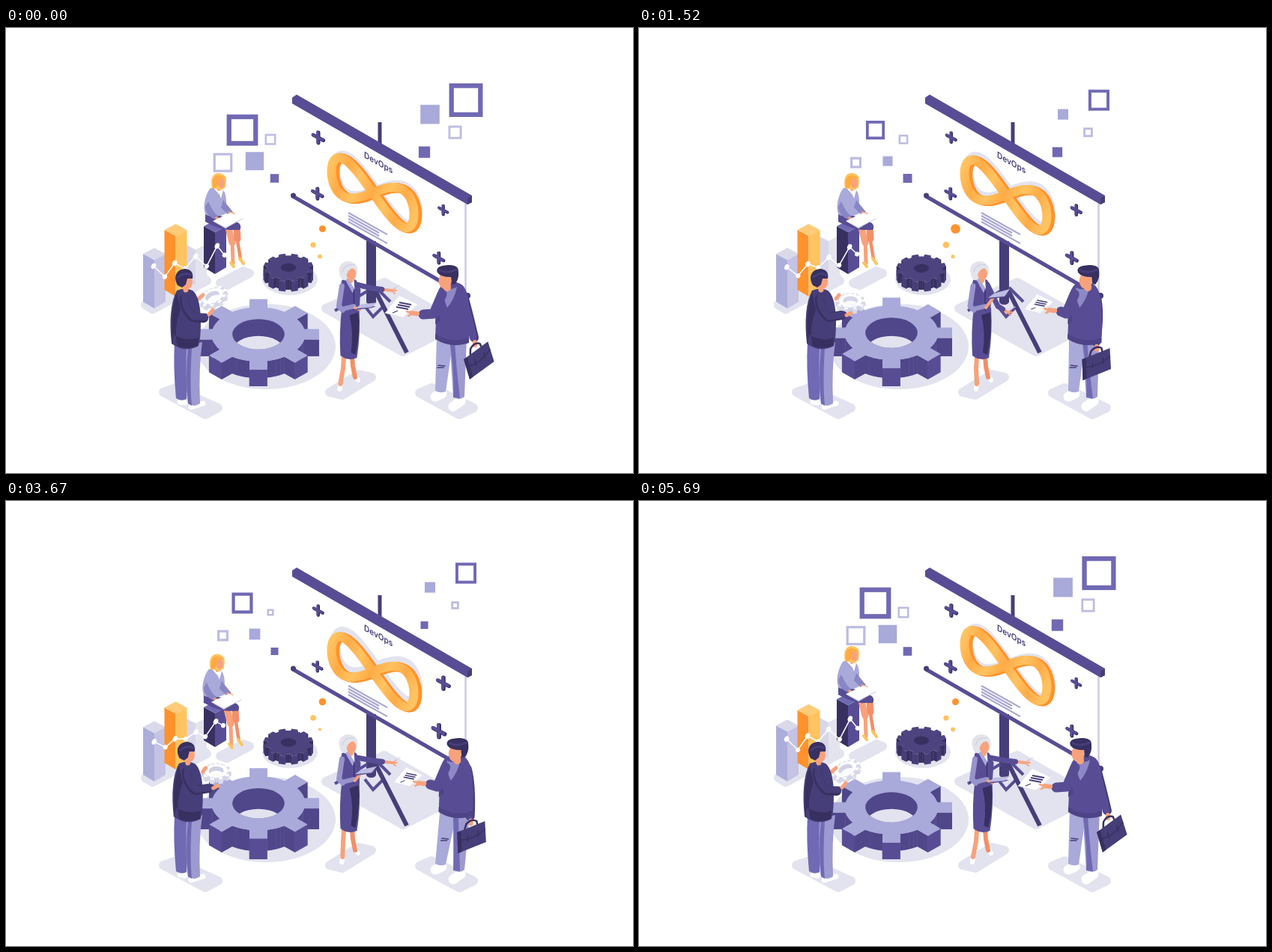
Write an HTML page with a canvas that moves like this. It is 837 px wide and 595 px high and loops after 5710 ms.

```html
<!DOCTYPE html>
<html lang="en">
<head>
<meta charset="utf-8">
<title>Team scene</title>
<style>
html, body { margin: 0; width: 100%; height: 100%; overflow: hidden; background: #fff; }
canvas { display: block; }
</style>
</head>
<body>
<canvas id="stage" width="837" height="595"></canvas>
<script>
const g = document.getElementById('stage').getContext('2d');
const LOOP = 5710;
const DARK = '#463e78', DEEP = '#383060', PURPLE = '#584d95', MID = '#7069b3',
  LAV = '#a9a9da', PALE = '#e2e3ef', EDGE = '#bdbce1',
  ORANGE = '#ff922d', AMBER = '#ffc360', SKIN = '#f8a27c';
let now = 0; // position in the loop, 0 to 1

const mix = (a, b, k) => a + (b - a) * k;
// Repeating swell between lo and hi, highest at phase `peak`; `sharp` narrows it.
const pulse = (lo, hi, peak, sharp = 1, cycles = 2) =>
  mix(lo, hi, (.5 + .5 * Math.cos(2 * Math.PI * (now * cycles - peak))) ** sharp);
// Single swell around `mid`; a higher `flat` gives a plateau.
const bump = (mid, width, flat = 2) => Math.exp(-(Math.abs((now - mid) / width) ** flat));

function fill(color, d) {
  g.fillStyle = color;
  g.fill(new Path2D(d));
}
function line(color, width, d, cap = 'round') {
  g.strokeStyle = color;
  g.lineWidth = width;
  g.lineCap = cap;
  g.lineJoin = cap === 'butt' ? 'miter' : 'round';
  g.stroke(new Path2D(d));
}
const poly = (color, ...pts) => fill(color, `M${pts.join(' ')}Z`);
function oval(color, x, y, rx, ry = rx, turn = 0) {
  g.fillStyle = color;
  g.beginPath();
  g.ellipse(x, y, rx, ry, turn, 0, 7);
  g.fill();
}
function blob(...pts) {
  const d = `M${pts.join(' ')}Z`;
  fill(PALE, d);
  line(PALE, 12, d);
}
function moved(x, y, draw, turn = 0, size = 1) {
  g.save();
  g.translate(x, y);
  g.rotate(turn);
  g.scale(size, size);
  draw();
  g.restore();
}

function square(x, y, size, color, border) {
  g.fillStyle = g.strokeStyle = color;
  g.lineWidth = border;
  g.lineJoin = 'miter';
  const s = size - (border || 0);
  g[border ? 'strokeRect' : 'fillRect'](x - s / 2, y - s / 2, s, s);
}
// Smaller squares peak earlier in the cycle.
function squares() {
  const big = pulse(25, 47, -.1), left = pulse(25, 42, -.03, 1.5);
  square(614, 96.5, big, MID, big * .14);
  square(315.5, 136.5, left, MID, left * .15);
  square(566, 115.5, pulse(12, 27, -.1), LAV);
  square(599.5, 139.5, pulse(10, 20, -.15), EDGE, 2.8);
  square(558.5, 166, pulse(10, 18, -.2), MID);
  square(289.5, 180, pulse(13, 27, -.1), EDGE, 3.2);
  square(332, 178, pulse(12, 25, -.07), LAV);
  square(353, 149, pulse(9, 18, -.2), EDGE, 2.5);
  square(358.5, 201, pulse(10, 16, -.25, 2), MID);
}

function shadows() {
  blob(210, 487, 225, 482, 283, 508, 266, 517);
  blob(432, 487, 471, 463, 488, 467, 449, 491);
  blob(552, 488, 568, 481, 624, 508, 605, 517);
  blob(286, 341, 317, 325, 325, 328, 295, 344);
  blob(186, 370, 260, 330, 268, 338, 196, 376);
  blob(427, 375, 505, 340, 603, 396, 530, 433);
  oval(PALE, 347, 426, 93, 57);
  oval(PALE, 379, 336, 37, 21);
}

const sink = () => 11 * bump(.66, .15);
function bar(x, top, base, left, right, cap) {
  poly(left, x, top + 8, x + 15, top + 16, x + 15, base, x, base - 9);
  poly(right, x + 15, top + 16, x + 30, top + 8, x + 30, base - 9, x + 15, base);
  poly(cap, x, top + 8, x + 15, top, x + 30, top + 8, x + 15, top + 16);
}
function bars() {
  bar(183, 294 + 12 * bump(.52, .06) - 30 * bump(.86, .08), 375, '#adadda', '#c4c3e3', '#d9d9ea');
  bar(238, pulse(266, 284, .15), 344, '#d7d7e8', '#e4e4ef', '#fff');
  bar(211.5, 262 + 40 * bump(.83, .14), 359, ORANGE, AMBER, '#ffcb78');
  bar(264, 257 + sink(), 329, DEEP, PURPLE, MID);
}
const rise = () => pulse(0, 1, .32, 2);
function chart() {
  const pts = [[197, 318], [212, 333], [225, 314], [239, 322], [253, 305], [268, 319], [282, 291], [292, 304]];
  const b = rise();
  const now = pts.map(([x, y], i) => [x + (i > 4 ? -2 : .8) * b, y + (i % 2 ? -4 : 4) * b]);
  line('#fff', 1.5, 'M' + now.join(' '));
  now.forEach(([x, y], i) => oval('#fff', x, y, 3, i % 2 ? 3.2 : 4, .5));
}

function plus(x, y, size) {
  moved(x, y, () => {
    const d = 'M0-8V8M-7.5-4L7.5 4';
    moved(1.2, .8, () => line(DEEP, 5.5, d));
    line(PURPLE, 4.2, d);
  }, 0, size / 20);
}
function infinity() {
  let d = '';
  for (let i = 0; i <= 80; i++) {
    const a = i * Math.PI / 40, u = 55 * Math.cos(a);
    d += `${i ? 'L' : 'M'}${490 + u} ${219.5 + .52 * u + 25 * Math.sin(2 * a)}`;
  }
  const tint = g.createLinearGradient(430, 190, 550, 240);
  for (let i = 0; i <= 6; i++) tint.addColorStop(i / 6, i % 2 ? '#ffab46' : AMBER);
  const dy = 9 * rise();
  moved(4, dy / 2 - 2, () => line(PALE, 14, d));
  for (let s = 4; s > 0; s--) moved(s, dy + s * .3, () => line(ORANGE, 12.5, d));
  moved(-.5, dy, () => line(tint, 12, d));
}
function screen() {
  line(DARK, 5, 'M499 126V158', 'butt');
  poly('#fff', 384, 100, 616, 235, 616, 356, 384, 222);
  line('#cccbe4', 2.5, 'M613.5 234V356', 'butt');
  line(DARK, 13, 'M487.5 285V366', 'butt');
  oval(DARK, 487.5, 366, 6.5, 4);
  line(PURPLE, 4, 'M482 352L439 378M479 372L490 386 504 372', 'butt');
  line(DARK, 6, 'M491 347L535 434', 'butt');
  line(PURPLE, 4, 'M494 347L513 366', 'butt');
  line(PURPLE, 5, 'M383 225L617 360', 'butt');
  oval(DARK, 383.5, 224, 3.5);
  oval(DARK, 616, 358, 4);
  poly(PURPLE, 382, 93, 388, 89, 622, 224, 622, 233, 616, 236, 382, 101);
  poly(DARK, 616, 228, 622, 224, 622, 233, 616, 236);
  for (let i = 0; i < 4; i++) {
    const w = i % 3 ? 41 : 52;
    line('#aaa8d1', 2.2, `M457 ${247 + 4 * i}l${w} ${w * .56}`, 'butt');
  }
  g.save();
  g.transform(.87, .5, 0, 1, 478, 173);
  g.fillStyle = DARK;
  g.font = '600 11.5px Inter, sans-serif';
  g.fillText('DevOps', 0, 0);
  g.restore();
  infinity();
  plus(416, 146, pulse(15, 18, -.1));
  plus(415, 221, pulse(15, 18, -.2));
  plus(583, 243, pulse(14, 19, .3, 2));
  plus(577, 307, pulse(16, 20, .3, 2));
}

function bubbles() {
  oval(ORANGE, 422.5, 268.5, pulse(4.5, 9.2, .5, 1, 3));
  oval(AMBER, 410, 290, pulse(3.6, 5.5, .5, 1, 3));
  oval(AMBER, 419, 305.5, pulse(2, 3.3, -.2));
}

// Flat-lying cogwheel: sides are drawn far to near, then the lid with its hole.
function gear(x, y, rx, ry, depth, teeth, o) {
  const pts = [], half = o.half, body = o.body, lean = Math.asin(half / body);
  const add = (r, a, tip) => pts.push([x + rx * r * Math.cos(a), y + ry * r * Math.sin(a), tip]);
  for (let i = 0; i < teeth; i++) {
    const a = i * 2 * Math.PI / teeth + (o.turn || 0), next = 2 * Math.PI / teeth - 2 * lean;
    add(body, a - lean);
    add(Math.hypot(1, half), a - Math.atan(half), true);
    add(Math.hypot(1, half), a + Math.atan(half));
    for (let k = 0; k < 4; k++) add(body, a + lean + next * k / 4);
  }
  pts.map((p, i) => [p, pts[(i + 1) % pts.length]])
    .filter(([p, q]) => p[0] > q[0])
    .sort((a, b) => a[0][1] + a[1][1] - b[0][1] - b[1][1])
    .forEach(([p, q]) => poly(p[2] ? o.tip : o.side,
      p[0], p[1], q[0] - .4, q[1], q[0] - .4, q[1] + depth, p[0], p[1] + depth));
  poly(o.top, ...pts.flatMap(p => p.slice(0, 2)));
  g.save();
  oval(o.hole, x, y, rx * o.bore, ry * o.bore);
  g.clip();
  if (o.floor) oval(o.floor, x, y + depth, rx * o.bore, ry * o.bore);
  g.restore();
}
function gears() {
  const lift = 6 * rise(), drop = lift / 2;
  gear(377, 320 + drop, 33, 18.5, 14 - drop, 12,
    { half: .13, body: .86, bore: .31, top: '#4d447f', tip: DARK, side: DEEP, hole: DEEP, turn: .26 });
  gear(337, 410 - lift, 81, 47, 22 + lift, 8,
    { half: .147, body: .77, bore: .43, top: LAV, tip: PURPLE, side: '#50468a', hole: '#50468a', floor: PALE });
}

function seated() {
  moved(-.2 * sink(), sink(), () => {
    line(SKIN, 9, 'M296 263L302 287');
    line(SKIN, 5, 'M302 285L303 314');
    line('#f28f69', 9, 'M308 266L309 282');
    line('#f28f69', 4.5, 'M309 284L313 309');
    line(AMBER, 4, 'M300 314L304 319M312 308L317 315');
    fill(PURPLE, 'M266 247C273 249 296 251 311 261Q315 265 312 270L300 270Q288 271 266 259Z');
    fill(LAV, 'M273 214C265 224 262 242 267 250Q280 255 294 248L294 230Q293 217 287 214Z');
    fill('#8886c3', 'M270 232Q277 248 283 251L279 256Q266 250 266 239ZM290 230L303 246 297 250 287 240Z');
    poly('#fff', 277, 214, 285, 223, 287, 228, 290, 217, 286, 214);
    line(SKIN, 4, 'M284 210V216');
    line(SKIN, 3.5, 'M281 254L290 258M298 247L304 249');
    poly('#fff', 276, 258, 300, 247, 317, 254, 293, 268);
    line('#c9c8e3', 1, 'M278 259L293 267 316 255');
    fill(AMBER, 'M275 214C272 200 277 193 285 194Q294 195 294 204L293 213 287 217Z');
    oval(SKIN, 287.5, 207, 4.5, 7);
    fill('#ffab42', 'M276 203Q280 192 294 201L285 201 282 212 276 215Z');
  });
}

const hold = () => 1 - pulse(0, 1, 0, 3);
function gearHolder() {
  const b = hold();
  line('#fff', 7, 'M232 500L239 501M247 507L263 502');
  fill(MID, 'M225 420L245 426 241 496Q234 500 227 495Q223 455 225 420Z');
  fill('#9c9ad0', 'M241 424L262 420Q257 455 259 502Q251 508 243 502Q239 462 241 424Z');
  fill(MID, 'M243 428L248 428Q245 475 248 505L243 502Q239 465 243 428Z');
  moved(3 * b, 0, () => {
    line(SKIN, 5, `M${257 + 3 * b} 362L${263 + b} 357`);
    fill(DARK, 'M228 351Q239 346 249 351C258 358 262 380 259 415L257 425Q239 435 221 422Q216 374 228 351Z');
    fill(DEEP, 'M228 354Q219 378 222 421L229 426Q223 402 233 377ZM224 410Q241 420 257 414L256 425Q238 432 222 422Z');
    line(DEEP, 12, `M238 362Q238 377 250 387L${mix(264, 267, b)} ${mix(388, 384, b)}`);
    line(DARK, 9, `M239 360Q238 375 251 386L${mix(266, 270, b)} ${mix(386, 383, b)}`);
    line(SKIN, 5, `M${mix(271, 274, b)} ${mix(383, 384, b)}L${mix(276, 280, b)} ${mix(377, 381, b)}`);
    line(SKIN, 7, 'M239 342L240 350');
    oval(SKIN, 243.5, 340, 5.5, 8.5);
    fill(DEEP, 'M229 344C222 331 229 322 240 322Q251 324 249 335L242 335 240 343 235 347Z');
    line(DARK, 3, 'M230 333Q239 326 247 330');
  });
}
function heldGear() {
  const b = hold(), scatter = pulse(0, 1, .72, 2);
  g.save();
  g.globalAlpha = 1 - .25 * scatter;
  moved(275 + 6 * b + 3 * scatter, 357 + 4 * b + 8 * scatter, () => {
    gear(0, 0, 20, 12, 6, 10,
      { half: .13, body: .8, bore: .5, top: '#fff', tip: '#dddeeb', side: '#d3d4e5', hole: '#cfd0e4', floor: '#fff' });
    g.setLineDash([4, 3]);
    line('#d5d6e6', 1.1, 'M-16 0A16 9.5 0 1 1 16 0A16 9.5 0 1 1-16 0');
  }, -.45 * (1 - b));
  g.restore();
}

function presenter() {
  const bent = bump(.27, .2, 4), raise = bump(.4, .3, 4), lean = 2.5 * (1 - bent);
  const hx = mix(516, 492, bent), hy = mix(350, 380, bent);
  const ex = mix(489, 479, bent), ey = mix(347, 372, bent);
  const foot = 451 - 2 * lean * (1 - raise), ty = 372 - 16 * raise, slope = 2 + 4 * raise;
  line('#fff', 6, `M${foot} 476L${foot - 1} 483M467 466L470 471`);
  line(SKIN, 6, `M451 440L450 455 ${foot} 476`);
  line('#f28f69', 6, 'M462 438L463 452 466 467');
  line(SKIN, 4, `M${ex} ${ey}L${hx} ${hy}`);
  line(SKIN, 2, `M${hx} ${hy}l5-4M${hx} ${hy}l6 0M${hx} ${hy}l4 4`);
  line('#d7d6e8', 1.2, `M${hx + 1} ${hy - 2}l9-5`);
  line(PURPLE, 7, `M${465 + lean} 343L${ex} ${ey}L${mix(ex, hx, .5)} ${mix(ey, hy, .5)}`);
  moved(lean * .6, 0, () => {
    fill(PURPLE, 'M447 374L470 374Q472 410 467 441Q455 446 445 438Q443 405 447 374Z');
    fill(DEEP, 'M457 384L469 380Q472 405 465 437L459 434Q463 407 457 384Z');
  });
  moved(lean, 0, () => {
    fill(PURPLE, 'M446 337Q457 333 465 337L471 350 469 379Q457 384 446 377L443 350Z');
    poly('#fff', 452, 335, 462, 336, 463, 349);
    poly(LAV, 450, 336, 455, 335, 463, 350, 460, 354);
    line(DEEP, 1.3, 'M462 350V377');
    line(SKIN, 6, 'M457 331L458 338');
    line('#9694cb', 7, 'M446 345L442 372 447 377');
    line('#9694cb', 6, 'M446 376L462 372');
  });
  line(SKIN, 4, `M${463 + lean} 374L472 ${ty + 5}`);
  poly(PURPLE, 465, ty + 6, 488, ty + 3, 494, ty - slope + 3, 474, ty);
  poly(EDGE, 466, ty + 4, 474, ty - 2, 495, ty - slope - 2, 488, ty + 2);
  moved(lean, 0, () => {
    oval('#e3e4eb', 454.5, 323.5, 12.5, 11.5);
    line('#e3e4eb', 5, 'M446 324Q444 333 450 335');
    oval(SKIN, 458.5, 329, 6.5, 8.5);
    fill('#e3e4eb', 'M446 330Q443 313 457 313Q466 315 466 322Q456 319 452 330Z');
    line('#cfd1df', 1.3, 'M447 326Q449 315 462 317');
  });
}

function briefcase(x, y, turn) {
  moved(x, y, () => {
    line(DEEP, 2.5, 'M-9-10L-7-17Q0-25 7-21L8-15');
    poly(DARK, -19, -6, 18, -21, 19.5, 7, -18, 22);
    poly(DEEP, -19, -6, -14, -8, -13, 20, -18, 22);
    line(DEEP, 1.4, 'M-17 4Q0 6 18-10M-5-2V6M9-8V0');
  }, turn);
}
function visitor() {
  const lean = bump(.5, .22, 4), home = pulse(0, 1, 0, 8, 1);
  const dx = 9 * lean + 3 * home - 1, head = 599 + 5 * lean - 9 * home;
  const hx = 546 + 5 * lean - 5 * home, hy = 377 + 4 * home;
  const gx = 607 + 16 * lean + 19 * home, gy = 428 + 3 * lean - 5 * home;
  line('#fff', 13, 'M573 493L582 489M597 506L607 499');
  fill(LAV, `M${573 + dx} 410L${595 + dx} 416 587 486Q580 489 573 485Z`);
  fill('#9c9ad0', `M${590 + dx} 415L${613 + dx} 413 612 493Q605 499 597 493Z`);
  fill(MID, `M${590 + dx} 416L${597 + dx} 416Q${598 + dx} 445 606 495L597 494Q599 465 ${590 + dx} 416Z`);
  line(DARK, 1.5, `M${575 + dx} 451l9 1M${574 + dx} 454l8 0`);

  line(DARK, 12, `M${609 + dx} 358Q${615 + dx} 380 ${gx - 1} ${gy - 9}`);
  line(PURPLE, 9, `M${608 + dx} 357Q${614 + dx} 380 ${gx - 2} ${gy - 10}`);
  moved(dx, 0, () => {
    fill(PURPLE, 'M582 342Q595 336 606 343C617 350 618 380 616 421Q592 429 571 415L573 363Q574 347 582 342Z');
    fill('#8d89c4', 'M582 347Q592 352 600 346Q597 362 587 374Q581 361 582 347Z');
    fill('#4d4386', 'M571 409Q593 423 616 414L616 421Q592 429 571 416ZM572 368L578 391 571 396Z');
  });
  line(PURPLE, 13, `M${580 + dx} 356L${569 + dx} 382L${hx + 16} ${hy + 2}`);

  moved(hx - 16, hy - 6, () => {
    poly('#fff', -19, 6, 0, -17, 25, -5, 5, 12);
    line('#dfe0ec', .8, 'M-19 6L5 12 24-5');
    line(DARK, 1.8, 'M0-8l16 3M-2-5l16 3M-4-2l16 3', 'butt');
    line(DARK, 1.2, 'M-9 6l7-3', 'butt');
  }, 0, .87 + .13 * home);
  line(SKIN, 6, `M${hx + 8} ${hy + 1}L${hx} ${hy}`);
  line(SKIN, 2.5, `M${hx} ${hy}l-6-2M${hx} ${hy + 2}l-4 2`);
  line(SKIN, 6, `M${gx} ${gy - 3}L${gx} ${gy + 1}`);
  briefcase(606 + 18 * lean + 25 * home, 449 - 5 * home, -.25 * home);

  moved(head, 0, () => {
    line(SKIN, 10, 'M-2 341L-1 347');
    oval(SKIN, -4, 338, 8.5, 11);
    fill(DEEP, 'M-14 327C-17 319-8 317 4 317Q15 318 14 326Q15 336 9 343L5 342 4 333Q-10 333-14 327Z');
    line(DARK, 3, 'M-11 324Q0 329 11 323');
  });
}

function draw() {
  g.clearRect(0, 0, 837, 595);
  squares();
  shadows();
  screen();
  bars();
  seated();
  chart();
  bubbles();
  gears();
  heldGear();
  gearHolder();
  presenter();
  visitor();
}

// Poses advance in 120 ms steps; every sixth one late in the loop is held twice.
function stepped(t) {
  if (t < 120) return 0;
  const n = Math.floor((t - 50) / 120), held = t > 4000 && n % 6 === 3;
  return 50 + (held ? n - 1 : n) * 120;
}
function tick(t) {
  now = stepped(t % LOOP) / LOOP;
  draw();
  requestAnimationFrame(tick);
}
tick(0);
</script>
</body>
</html>
```
